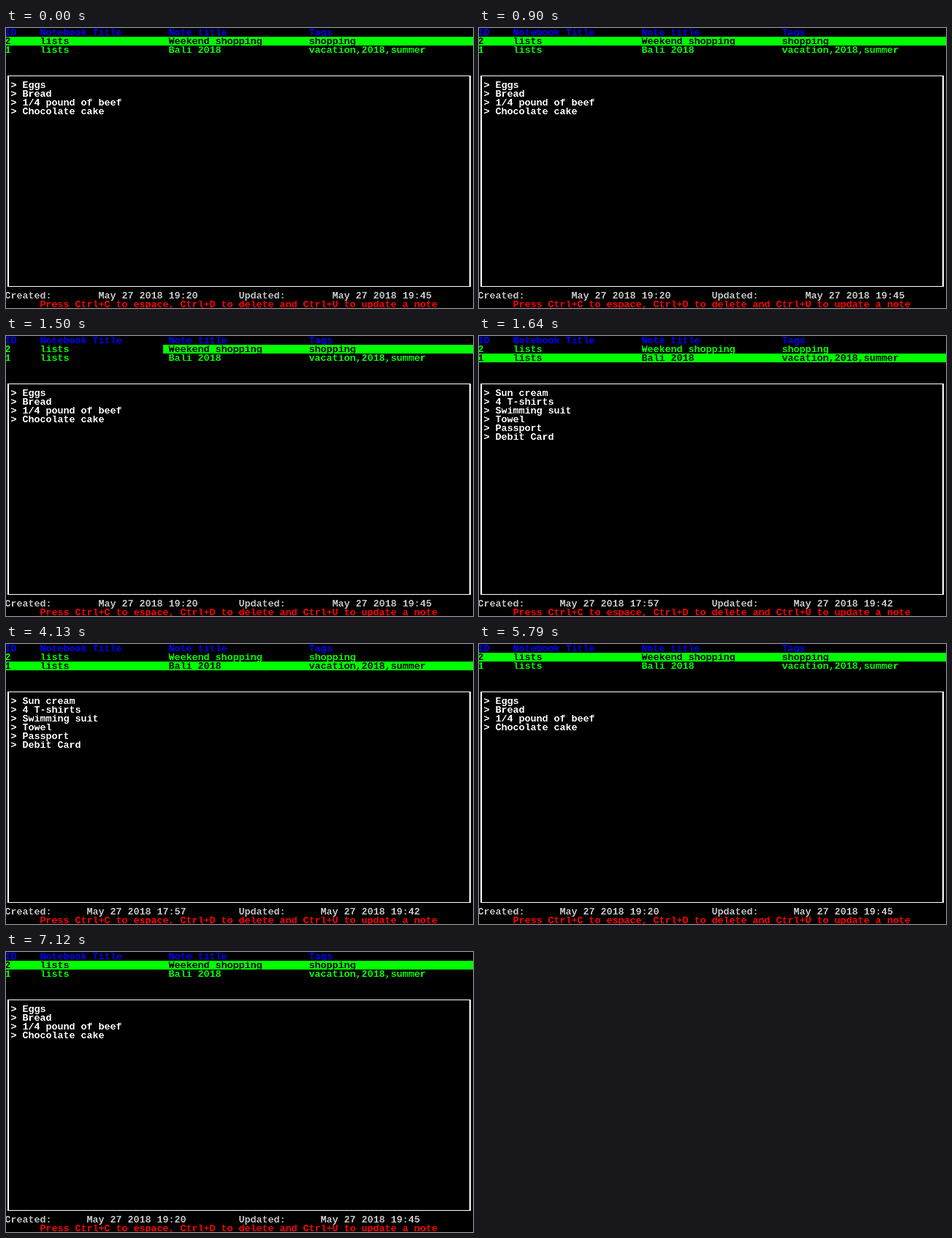
Write an HTML page that moves like this. It is 639 px wide and 383 px high and loops after 8 s.

```html
<!DOCTYPE html>
<html lang="en">
<head>
<meta charset="utf-8">
<title>Terminal notes</title>
<style>
  html, body { margin: 0; width: 100%; height: 100%; overflow: hidden; background: #000; }
  svg { display: block; width: 639px; height: 383px; background: #000; }
  text {
    font: bold 13.333px "Liberation Mono", "Courier New", monospace;
    white-space: pre;
  }
  .crisp { filter: url(#crisp); }
  .blue { fill: #00f; }
  .green { fill: #0f0; }
  .red { fill: #f00; }
  .grey { fill: #c0c0c0; }
  .white { fill: #fff; }
  .black { fill: #000; }
  .view { visibility: hidden; animation: 8s step-end infinite; }
  #start { animation-name: start; }
  #partial { animation-name: partial; }
  #trip { animation-name: trip; }
  #back { animation-name: back; }
  @keyframes start { 0% { visibility: visible } 18.75%, 100% { visibility: hidden } }
  @keyframes partial { 0% { visibility: hidden } 18.75% { visibility: visible } 20.5%, 100% { visibility: hidden } }
  @keyframes trip { 0% { visibility: hidden } 20.5% { visibility: visible } 72.375%, 100% { visibility: hidden } }
  @keyframes back { 0% { visibility: hidden } 72.375%, 100% { visibility: visible } }
</style>
</head>
<body>
<svg viewBox="0 0 639 383">
  <defs>
    <!-- steeper glyph edges for the console type -->
    <filter id="crisp" filterUnits="userSpaceOnUse" x="0" y="0" width="639" height="383" color-interpolation-filters="sRGB">
      <feComponentTransfer><feFuncA type="linear" slope="1.6" intercept="-0.3"/></feComponentTransfer>
    </filter>
  </defs>
  <!-- note frame: 2px sides, 1px top and bottom -->
  <path d="M2 65H636V354H2Z M4 66V353H634V66Z" fill="#fff" fill-rule="evenodd" shape-rendering="crispEdges"/>
  <g id="fixed" class="crisp"></g>
  <g id="start" class="view"></g>
  <g id="partial" class="view"></g>
  <g id="trip" class="view"></g>
  <g id="back" class="view"></g>
</svg>
<script>
  const CELL_W = 8, CELL_H = 12, LEFT = -1, TEXT_LEFT = -1.5, BASELINE = 10;
  const COLS = [0, 6, 28, 52];
  const NOTES = [
    ['2', 'lists', 'Weekend shopping', 'shopping'],
    ['1', 'lists', 'Bali 2018', 'vacation,2018,summer']
  ];
  const SHOPPING = ['Eggs', 'Bread', '1/4 pound of beef', 'Chocolate cake'];
  const PACKING = ['Sun cream', '4 T-shirts', 'Swimming suit', 'Towel', 'Passport', 'Debit Card'];

  function add(parent, tag, attrs, content = '') {
    const el = document.createElementNS('http://www.w3.org/2000/svg', tag);
    for (const key in attrs) el.setAttribute(key, attrs[key]);
    el.textContent = content;
    return parent.appendChild(el);
  }

  function put(layer, row, col, colour, content) {
    add(layer, 'text', {
      x: TEXT_LEFT + col * CELL_W,
      y: row * CELL_H + BASELINE,
      class: colour
    }, content);
  }

  function drawView(id, { selected, barCol = 0, items, dateCol, created, updated }) {
    const view = document.getElementById(id);
    add(view, 'rect', {
      x: LEFT + barCol * CELL_W, y: (selected + 1) * CELL_H,
      width: 640 - barCol * CELL_W, height: CELL_H, class: 'green'
    });
    const layer = add(view, 'g', { class: 'crisp' });
    NOTES.forEach((note, i) => note.forEach((field, j) => {
      const onBar = i === selected && COLS[j] >= barCol;
      put(layer, i + 1, COLS[j], onBar ? 'black' : 'green', field);
    }));
    items.forEach((item, i) => put(layer, 6 + i, 1, 'white', '> ' + item));
    put(layer, 30, dateCol, 'grey', 'May 27 2018 ' + created);
    put(layer, 30, dateCol + 40, 'grey', 'May 27 2018 ' + updated);
  }

  const fixed = document.getElementById('fixed');
  ['ID', 'Notebook Title', 'Note title', 'Tags'].forEach((name, i) => put(fixed, 0, COLS[i], 'blue', name));
  put(fixed, 30, 0, 'grey', 'Created:');
  put(fixed, 30, 40, 'grey', 'Updated:');
  put(fixed, 31, 6, 'red', 'Press Ctrl+C to espace, Ctrl+D to delete and Ctrl+U to update a note');

  const shopping = { selected: 0, items: SHOPPING, created: '19:20', updated: '19:45' };
  drawView('start', { ...shopping, dateCol: 16 });
  drawView('partial', { ...shopping, dateCol: 16, barCol: 27 });
  drawView('trip', { selected: 1, items: PACKING, dateCol: 14, created: '17:57', updated: '19:42' });
  drawView('back', { ...shopping, dateCol: 14 });
</script>
</body>
</html>
```
